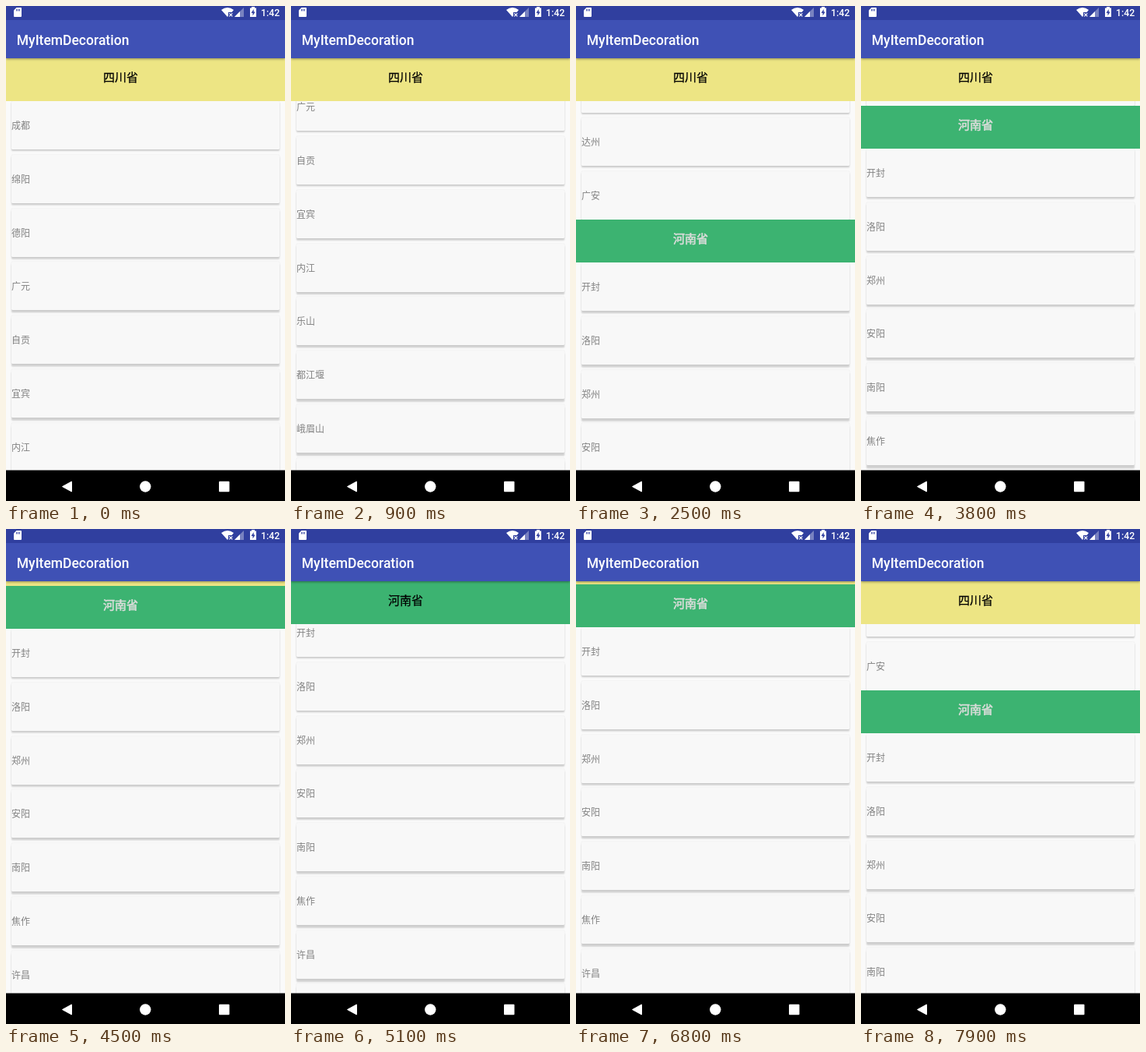
An HTML page that plays this animation: 359x635 px, repeating every 8 s.

```html
<!DOCTYPE html>
<html lang="zh-CN">
<head>
<meta charset="utf-8">
<style>
html, body { margin: 0; width: 100%; height: 100%; overflow: hidden; background: #fafafa; }
#stage { position: relative; width: 359px; height: 635px; overflow: hidden; background: #fafafa;
  font-family: "Noto Sans CJK SC", "Noto Sans CJK", sans-serif; }
#stage > * { position: absolute; left: 0; top: 0; }
.card { width: 345px; height: 62px; margin-left: 7px; border-radius: 1.5px; background: #f8f8f8;
  font-size: 12px; line-height: 61px; color: #828282; }
.head { width: 359px; height: 55px; font-size: 15px; line-height: 47.5px; text-indent: 125px;
  color: #000; -webkit-text-stroke: .25px; }
.head.free { color: #d9dcd9; -webkit-text-stroke: .6px; }
#first { background: #ede584; transform: translateY(67px); }
#second { background: #3cb371; }
#bar { width: 359px; height: 67px; background: linear-gradient(#303f9f 18px, #3f51b5 18px);
  box-shadow: 0 1px 3px rgba(0, 0, 0, .4); }
#icons { font-family: Roboto, sans-serif; font-weight: 500; fill: #fff; }
</style>
</head>
<body>
<div id="stage">
  <div id="first" class="head">四川省</div>
  <div id="second" class="head">河南省</div>
  <div id="bar"></div>
  <svg id="icons" width="359" height="635">
    <text x="13.8" y="50" font-size="17.5">MyItemDecoration</text>
    <text x="328" y="13" font-size="12.3">1:42</text>
    <path d="M13.5 2H19q1 0 1 1V13q0 1-1 1H11q-1 0-1-1V5.5Z"/>
    <path d="M13.5 4v2.5M15.5 4v2.5M17.5 4v2.5" stroke="#303f9f"/>
    <path d="M277 5Q285-1 293 5L290.5 8H286V12.5L285 14Z"/>
    <path d="M287.3 9.3l4 4m0-4l-4 4" stroke="#fff" stroke-width="1.2"/>
    <path d="M306 2V14H294Z" opacity=".35"/>
    <path d="M301 7V14H294Z"/>
    <path d="M316 2.5V1H320V2.5H322V14H314V2.5Z"/>
    <path d="M318.7 4L315.5 9H317.5V12.5L320.6 7.4H318.7Z" fill="#303f9f"/>
    <rect y="595.5" width="359" height="40" fill="#000"/>
    <path d="M72.5 616.5L84.5 610V623Z" stroke="#fff" stroke-linejoin="round"/>
    <circle cx="179.3" cy="616.5" r="7.2"/>
    <rect x="274" y="609.8" width="13.5" height="13.5" rx="1"/>
  </svg>
</div>
<script>
const PITCH = 68.75, TOP = 67, LOOP = 8000;
const sichuan = '成都 绵阳 德阳 广元 自贡 宜宾 内江 乐山 都江堰 峨眉山 简阳 达州 广安'.split(' ');
const henan = '开封 洛阳 郑州 安阳 南阳 焦作 许昌 新乡'.split(' ');

// [time, y of the second header], eased while swiping
const path = [
  [0, 1009], [500, 1009], [1000, 752, 1], [1200, 752], [1700, 485, 1], [1800, 485],
  [1900, 481], [2000, 481], [2500, 274, 1], [2700, 274], [3600, 140], [3800, 128],
  [4500, 73], [5100, 47], [5500, 36], [5900, 36], [6800, 71], [7900, 207], [LOOP, 207]
];

const stage = document.getElementById('stage');
const first = document.getElementById('first');
const second = document.getElementById('second');

function addCard(name, offset) {
  const el = document.createElement('div');
  el.className = 'card';
  el.textContent = name;
  stage.insertBefore(el, first);
  return { el, offset };
}

const cards = [
  ...sichuan.map((s, i) => addCard(s, -62 - PITCH * (sichuan.length - 1 - i))),
  ...henan.map((s, i) => addCard(s, 55 + PITCH * i))
];

function headerY(t) {
  const i = path.findIndex(p => p[0] > t);
  const [t0, y0] = path[i - 1], [t1, y1, ease] = path[i];
  let k = (t - t0) / (t1 - t0);
  if (ease) k = k * k * (3 - 2 * k);
  return Math.round(y0 + (y1 - y0) * k);
}

function draw(now) {
  const y = headerY(Math.floor(now % LOOP / 100) * 100);
  for (const { el, offset } of cards) {
    const top = Math.round(y + offset);
    el.style.transform = `translateY(${top}px)`;
    // shadows grow towards the bottom of the screen
    const drop = 1.5 + Math.max(0, top) / 200;
    el.style.boxShadow = `0 ${drop}px 2px rgba(0,0,0,.17), 0 0 1.5px rgba(0,0,0,.12)`;
  }
  second.style.transform = `translateY(${Math.max(y, TOP)}px)`;
  second.classList.toggle('free', y > TOP);
  requestAnimationFrame(draw);
}
requestAnimationFrame(draw);
</script>
</body>
</html>
```
